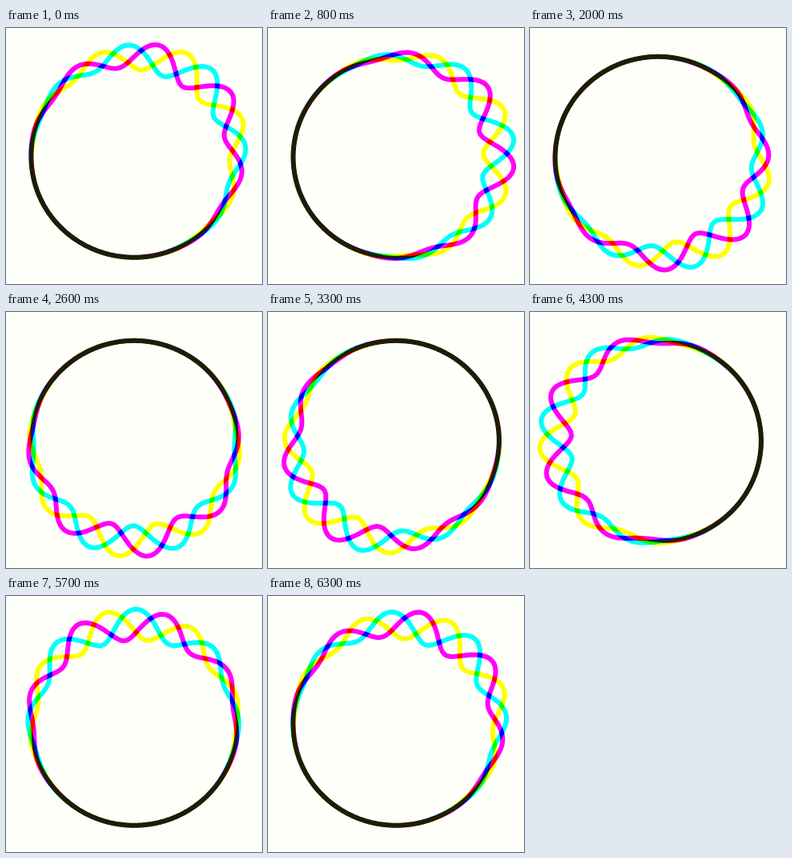
An HTML page with a canvas that plays this animation: 320x320 px, repeating every 6.4 s.

```html
<!DOCTYPE html>
<html lang="en">
<head>
<meta charset="utf-8">
<title>Braided ring</title>
<style>
  html, body { margin: 0; height: 100%; overflow: hidden; background: #fffffa; }
  canvas { display: block; }
</style>
</head>
<body>
<canvas width="320" height="320"></canvas>
<script>
const TAU = 2 * Math.PI;
const LOOP = 6400, STEP = 100, SIZE = 320;
const CENTER = { x: 160.2, y: 161.3 };
const RADIUS = 128.7, SQUEEZE = 0.975;
const WAVES = 8, AMPLITUDE = 20, FALLOFF = 2.75;
const BULGE_START = -TAU * 10 / 64;
const SEGMENTS = 360;
const PAPER = '#fffffa', OVERLAP = '#201c00';

const strands = [
  { color: '#ff0', phase: -TAU / 3 },
  { color: '#0ff', phase: TAU / 3 },
  { color: '#f0f', phase: 0 },
];

const ctx = document.querySelector('canvas').getContext('2d');
const overlap = new OffscreenCanvas(SIZE, SIZE).getContext('2d');
ctx.lineWidth = overlap.lineWidth = 6;
overlap.strokeStyle = OVERLAP;

// The bulge runs clockwise once per loop while the waves drift back by one.
function strandPath(phase, turn) {
  const path = new Path2D();
  for (let i = 0; i < SEGMENTS; i++) {
    const angle = TAU * i / SEGMENTS;
    const envelope = ((1 + Math.cos(angle - turn - BULGE_START)) / 2) ** FALLOFF;
    const r = RADIUS + AMPLITUDE * envelope * Math.sin(WAVES * angle + turn + phase);
    path.lineTo(CENTER.x + r * Math.cos(angle), CENTER.y + r * SQUEEZE * Math.sin(angle));
  }
  path.closePath();
  return path;
}

function draw() {
  const time = Math.floor(performance.now() % LOOP / STEP) * STEP;
  ctx.globalCompositeOperation = 'source-over';
  ctx.fillStyle = PAPER;
  ctx.fillRect(0, 0, SIZE, SIZE);
  overlap.clearRect(0, 0, SIZE, SIZE);

  ctx.globalCompositeOperation = 'multiply';
  strands.forEach(({ color, phase }, i) => {
    const path = strandPath(phase, TAU * time / LOOP);
    ctx.strokeStyle = color;
    ctx.stroke(path);
    overlap.globalCompositeOperation = i ? 'source-in' : 'source-over';
    overlap.stroke(path);
  });

  // Where all three strands meet, soften black to a dark olive.
  ctx.globalCompositeOperation = 'lighten';
  ctx.drawImage(overlap.canvas, 0, 0);
  requestAnimationFrame(draw);
}
draw();
</script>
</body>
</html>
```
